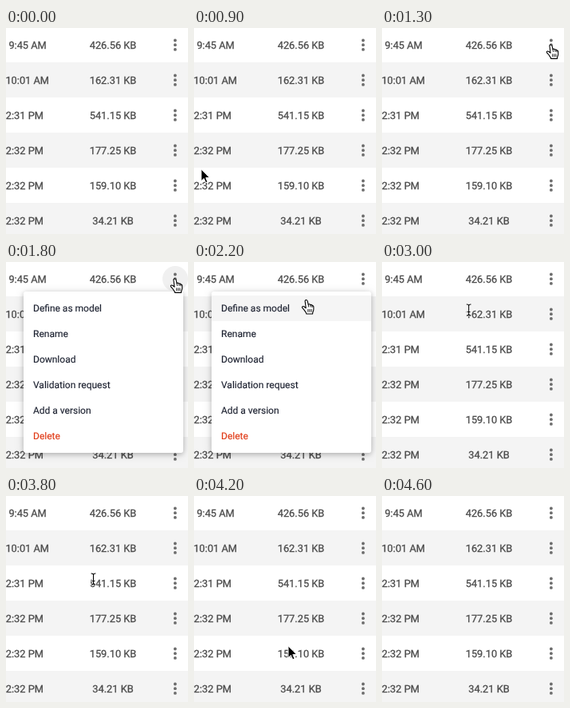
An HTML page that plays this animation: 228x258 px, repeating every 5500 ms.

```html
<!DOCTYPE html>
<html lang="en">
<head>
<meta charset="utf-8">
<title>File list menu</title>
<style>
  html, body { margin: 0; width: 100%; height: 100%; overflow: hidden; background: #fff; }
  svg { display: block; width: 100vw; height: 100vh; font-family: Roboto, Arial, sans-serif; }
  text { text-rendering: geometricPrecision; }
  .row { font-size: 12.8px; fill: #4c4c4c; stroke: #4c4c4c; stroke-width: .3px; }
  .item { font-size: 12px; fill: #1c2130; stroke: #1c2130; stroke-width: .15px; }
  .item.warn { fill: #e03a16; stroke: #e03a16; }
  #panel { filter: drop-shadow(0 2px 3px rgba(0,0,0,.2)) drop-shadow(0 1px 6px rgba(0,0,0,.12)); }
</style>
</head>
<body>
<svg viewBox="0 0 228 258">
  <rect width="228" height="258" fill="#fff"/>
  <g id="rows"></g>
  <g id="menu">
    <rect id="panel" x="22" y="37" width="200" height="202" rx="3" fill="#fff"/>
    <rect id="hover" x="22" y="42" width="200" height="32" fill="#f5f5f5"/>
    <g id="items"></g>
  </g>
  <g id="cursor" stroke-linejoin="round" stroke-linecap="round">
    <path id="arrow" d="M0 0V14.6L3.4 11.5L5.7 16.8L8 15.8L5.8 10.6H10.4Z"
      fill="#000" stroke="#fff"/>
    <g id="beam" fill="none">
      <path d="M-2.5-7Q0-7 0-5Q0-7 2.5-7M0-5V5M-2.5 7Q0 7 0 5Q0 7 2.5 7M-1.5 2.5H1.5" stroke="#fff" stroke-width="2.6"/>
      <path d="M-2.5-7Q0-7 0-5Q0-7 2.5-7M0-5V5M-2.5 7Q0 7 0 5Q0 7 2.5 7M-1.5 2.5H1.5" stroke="#000" stroke-width="1.1"/>
    </g>
    <g id="hand" stroke="#000" stroke-width="1.1">
      <path fill="#fff" d="M-1.5 2.2C-2-.1 .8-.5 1.5 1.6L2.6 6C3.2 5 5 5.2 5.2 6.5C6 5.8 7.3 6.2 7.4 7.4
        C8.3 7 9.2 7.7 9.2 8.9V12C9.2 14 7.9 15 7.9 17.6H.2C.2 15.7-2 14-3.2 12L-5 10C-5.8 8.4-4 7.6-2.6 8.7L-.4 10.4Z"/>
      <path fill="none" d="M2.6 6L3 8.7M5.2 6.5L5.5 8.8M7.4 7.4V9.2M2.2 12V15M4.3 12V15M6.4 12V15" stroke-width=".9"/>
    </g>
  </g>
</svg>
<script>
const LOOP = 5500, STEP = 100, ROW = 44;
const $ = id => document.getElementById(id);
const show = (id, on) => $(id).setAttribute('visibility', on ? 'visible' : 'hidden');

const files = [
  [3.4, '9:45 AM', '426.56 KB'],
  [-.6, '10:01 AM', '162.31 KB'],
  [-.2, '2:31 PM', '541.15 KB'],
  [-.2, '2:32 PM', '177.25 KB'],
  [-.2, '2:32 PM', '159.10 KB'],
  [-.2, '2:32 PM', '34.21 KB']
];
const actions = ['Define as model', 'Rename', 'Download', 'Validation request', 'Add a version', 'Delete'];

$('rows').innerHTML = files.map(([x, time, size], i) => {
  const mid = 21 + i * ROW;
  const dots = [-5.7, 0, 5.7].map(d => `<circle cx="211.9" cy="${mid + .2 + d}" r="1.9" fill="#6c6c6c"/>`).join('');
  return (i % 2 ? `<rect y="${mid - 22}" width="228" height="${ROW}" fill="#f4f4f4"/>` : '') +
    (i ? '' : '<circle id="ripple" cx="212" cy="21" r="16" fill="#f0f0f0"/>') +
    `<text class="row" x="${x}" y="${mid + 5}">${time}</text>` +
    `<text class="row" x="134" y="${mid + 5}" text-anchor="middle">${size}</text>${dots}`;
}).join('');

$('items').innerHTML = actions.map((name, i) =>
  `<text class="item${name === 'Delete' ? ' warn' : ''}" x="34" y="${62 + i * 32}">${name}</text>`).join('');

// Pointer path: time, x, y
const path = [
  [900, 9, 177], [1000, 82, 139], [1100, 166, 92], [1200, 215, 50], [1300, 211.5, 20.8],
  [1800, 211.5, 20.8], [2000, 176, 34], [2300, 123, 54], [2500, 109, 59.8],
  [3300, 108.5, 60], [3800, 109.5, 104], [3900, 108.5, 118.5], [4200, 118, 188], [4500, 121.5, 243]
];

function pointAt(t) {
  const i = path.findIndex(p => p[0] >= t);
  if (i <= 0) return path[0].slice(1);
  const [a, b] = [path[i - 1], path[i]];
  const k = (t - a[0]) / (b[0] - a[0]);
  return [a[1] + (b[1] - a[1]) * k, a[2] + (b[2] - a[2]) * k];
}

function cursorAt(t, x, y) {
  const open = t > 1800 && t < 3000;
  if (open) return y >= 37 ? 'hand' : 'arrow';
  if (x > 196 && y < 37) return 'hand';
  const overText = Math.abs((y + 1) % ROW - 22) < 9 && (x < 50 || (x > 104 && x < 164));
  return overText ? 'beam' : 'arrow';
}

function draw(ms) {
  const t = Math.floor(ms % LOOP / STEP) * STEP;
  const visible = t >= 900 && t < 4600;
  const [x, y] = pointAt(Math.min(t, 4500));
  const kind = cursorAt(t, x, y);
  $('cursor').setAttribute('transform', `translate(${x} ${y})`);
  for (const id of ['arrow', 'beam', 'hand']) show(id, visible && id === kind);
  show('ripple', t === 1800);
  show('menu', t >= 1800 && t < 2900);
  $('menu').setAttribute('opacity', t === 2800 ? .45 : 1);
  $('hover').setAttribute('opacity', t > 1800 && y >= 42 ? 1 : 0);
}

const start = performance.now();
function tick() {
  draw(performance.now() - start);
  requestAnimationFrame(tick);
}
tick();
</script>
</body>
</html>
```
